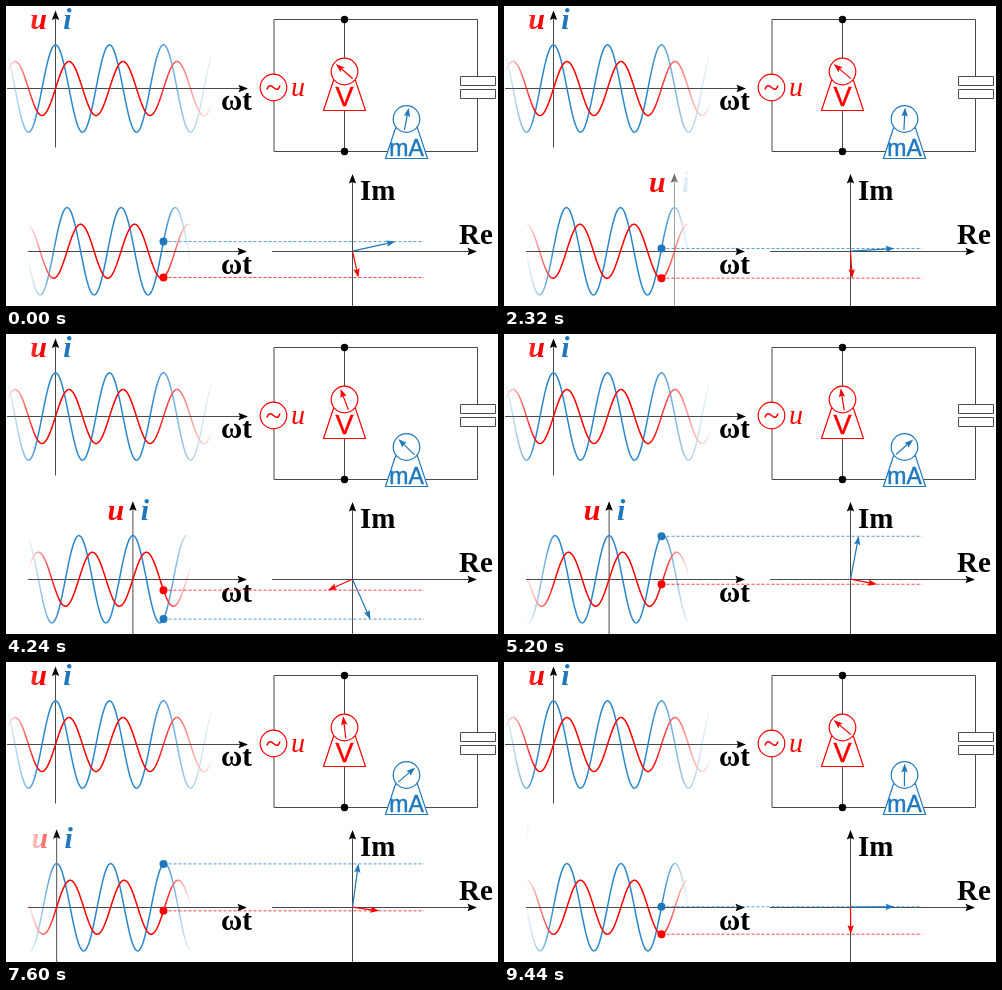
Animation of 492 by 300 pixels, one loop 9.52 s. Source, as an HTML page:

```html
<!DOCTYPE html>
<html lang="en">
<head>
<meta charset="utf-8">
<title>Capacitor in an AC circuit</title>
<style>
  html, body { margin: 0; width: 100%; height: 100%; overflow: hidden; background: #fff; }
  svg { display: block; width: 492px; height: 300px; }
  .line { fill: none; stroke: #4a4a4a; stroke-width: 1; }
  .box { fill: #fff; stroke: currentColor; stroke-width: 1.2; }
  .plate { fill: #fff; stroke: #4a4a4a; }
  .wave { fill: none; stroke: currentColor; stroke-width: 1.5; }
  .wave.i { color: #2a86cc; }
  .needle { stroke: currentColor; stroke-width: 1.2; fill: currentColor; }
  .needle use { stroke: none; }
  .dash { stroke: currentColor; stroke-width: 1; stroke-dasharray: 3 2; opacity: .75; }
  .u { color: #f00; }
  .i { color: #1f78be; }
  text { fill: currentColor; font: bold 29px "Liberation Serif", serif; }
  .var { font-style: italic; font-size: 30px; text-anchor: middle; }
  .unit { font: 23px "Liberation Sans", sans-serif; text-anchor: middle; stroke: currentColor; stroke-width: .5; }
</style>
</head>
<body>
<svg viewBox="0 0 492 300">
  <defs>
    <path id="head" d="M0 0l-9.500 3.700 1.500-3.700-1.500-3.700z"/>
    <path id="tip" d="M0 0l-9 3.200 1.500-3.200-1.500-3.200z"/>

    <g id="plot">
      <path class="line" d="M0 59V-70"/>
      <use href="#head" transform="translate(0 -78) rotate(-90)"/>
      <path id="waveI" class="wave i"/>
      <path id="waveU" class="wave u"/>
      <text class="var u" x="-17" y="-59.500">u</text>
      <text class="var i" x="12" y="-59.500">i</text>
    </g>

    <linearGradient id="fadeTop" gradientUnits="userSpaceOnUse" x1="2" x2="205">
      <stop offset="0" stop-color="#fff" stop-opacity=".08"/>
      <stop offset=".15" stop-color="#fff"/>
      <stop offset=".7" stop-color="#fff"/>
      <stop offset="1" stop-color="#fff" stop-opacity=".08"/>
    </linearGradient>
    <linearGradient id="fadeBottom" gradientUnits="userSpaceOnUse" x1="23" x2="184">
      <stop offset="0" stop-color="#fff" stop-opacity=".08"/>
      <stop offset=".18" stop-color="#fff"/>
      <stop offset=".83" stop-color="#fff"/>
      <stop offset="1" stop-color="#fff" stop-opacity=".08"/>
    </linearGradient>
    <mask id="maskTop" maskUnits="userSpaceOnUse" x="2" y="0" width="203" height="160">
      <rect x="2" width="203" height="160" fill="url(#fadeTop)"/>
    </mask>
    <mask id="maskBottom" maskUnits="userSpaceOnUse" x="23" y="160" width="161" height="140">
      <rect x="23" y="160" width="161" height="140" fill="url(#fadeBottom)"/>
    </mask>
  </defs>

  <!-- time plots -->
  <path class="line" d="M1 82.500H236M22 245.500H233"/>
  <use href="#head" x="242" y="82.500"/>
  <use href="#head" x="241" y="245.500"/>
  <g mask="url(#maskTop)"><use href="#plot" x="49.500" y="82.500"/></g>
  <g mask="url(#maskBottom)"><use id="scroll" href="#plot" y="245.200"/></g>
  <text x="215" y="104">ωt</text>
  <text x="215" y="268">ωt</text>

  <!-- circuit -->
  <path class="line" d="M268 13.500H471.500V145.500H268ZM338.500 13V145"/>
  <circle cx="338.500" cy="13.500" r="3.700"/>
  <circle cx="338.500" cy="145.500" r="3.700"/>
  <rect x="465" y="80" width="14" height="3" fill="#fff"/>
  <path class="plate" d="M454.500 70.500h35v9h-35zM454.500 83.500h35v9h-35z"/>
  <g class="u">
    <circle class="box" cx="267.500" cy="81.500" r="13.300"/>
    <path class="wave" d="M261 83.500c1.500-5 4-4.500 6.500-2s5 3 6.500-2"/>
    <text x="285" y="90" style="font-weight:normal;font-style:italic;font-size:28px">u</text>
  </g>
  <g class="u" transform="translate(338.500 65.500)">
    <path class="box" d="M-11 9L-21 39H21L11 9z"/>
    <circle class="box" r="13.300"/>
    <text class="unit" y="34" style="font-size:27px">V</text>
    <g id="meterU" class="needle"><path d="M0 11V-6"/><use href="#tip" transform="translate(0 -11.500) rotate(-90)"/></g>
  </g>
  <g class="i" transform="translate(400.500 113)">
    <path class="box" d="M-11 9L-21 39.500H21L11 9z"/>
    <circle class="box" r="13.300"/>
    <text class="unit" y="36.500">mA</text>
    <g id="meterI" class="needle"><path d="M0 11V-6"/><use href="#tip" transform="translate(0 -11.500) rotate(-90)"/></g>
  </g>

  <!-- phasor diagram -->
  <path class="line" d="M266 245.500H463M346.500 300V176"/>
  <use href="#head" x="471" y="245.500"/>
  <use href="#head" transform="translate(346.500 168) rotate(-90)"/>
  <text x="354" y="194">Im</text>
  <text x="453" y="238">Re</text>
  <g class="i">
    <path id="levelI" class="dash" d="M157.500 0H418"/>
    <g id="phasorI" class="needle"><path d="M0 0H38"/><use href="#tip" x="44"/></g>
    <circle id="dotI" cx="157.500" r="4" fill="currentColor"/>
  </g>
  <g class="u">
    <path id="levelU" class="dash" d="M157.500 0H418"/>
    <g id="phasorU" class="needle"><path d="M0 0H21"/><use href="#tip" x="27"/></g>
    <circle id="dotU" cx="157.500" r="4" fill="currentColor"/>
  </g>
</svg>
<script>
  const LOOP = 9520, STEP = 80, CYCLES = 4;
  const WAVELENGTH = 54, START_X = 223.1, DOT_X = 157.5, AXIS_Y = 245.2, ORIGIN_X = 346.5;
  const SWING = 50;
  const signals = [
    { name: 'I', amp: 43.7, lead: 90 },
    { name: 'U', amp: 27, lead: 0 }
  ];
  const byId = id => document.getElementById(id);
  const move = (id, value) => byId(id).setAttribute('transform', value);
  const sinDeg = a => Math.sin(a * Math.PI / 180);
  const phaseAt = x => x / WAVELENGTH * 360;

  for (const { name, amp, lead } of signals) {
    let d = '';
    for (let x = -204; x <= 180; x++) {
      d += `${d ? 'L' : 'M'}${x} ${(-amp * sinDeg(phaseAt(x) + lead)).toFixed(2)}`;
    }
    byId('wave' + name).setAttribute('d', d);
  }

  function draw(time) {
    const elapsed = Math.floor(time % LOOP / STEP) * STEP;
    const axisX = START_X - CYCLES * WAVELENGTH * elapsed / LOOP;
    byId('scroll').setAttribute('x', axisX);
    for (const { name, amp, lead } of signals) {
      const angle = phaseAt(DOT_X - axisX) + lead;
      const value = sinDeg(angle);
      const y = AXIS_Y - amp * value;
      move('level' + name, `translate(0 ${y})`);
      move('dot' + name, `translate(0 ${y})`);
      move('phasor' + name, `translate(${ORIGIN_X} ${AXIS_Y}) rotate(${-angle})`);
      move('meter' + name, `rotate(${SWING * value})`);
    }
  }

  const start = performance.now();
  function tick() {
    draw(performance.now() - start);
    requestAnimationFrame(tick);
  }
  tick();
</script>
</body>
</html>
```
